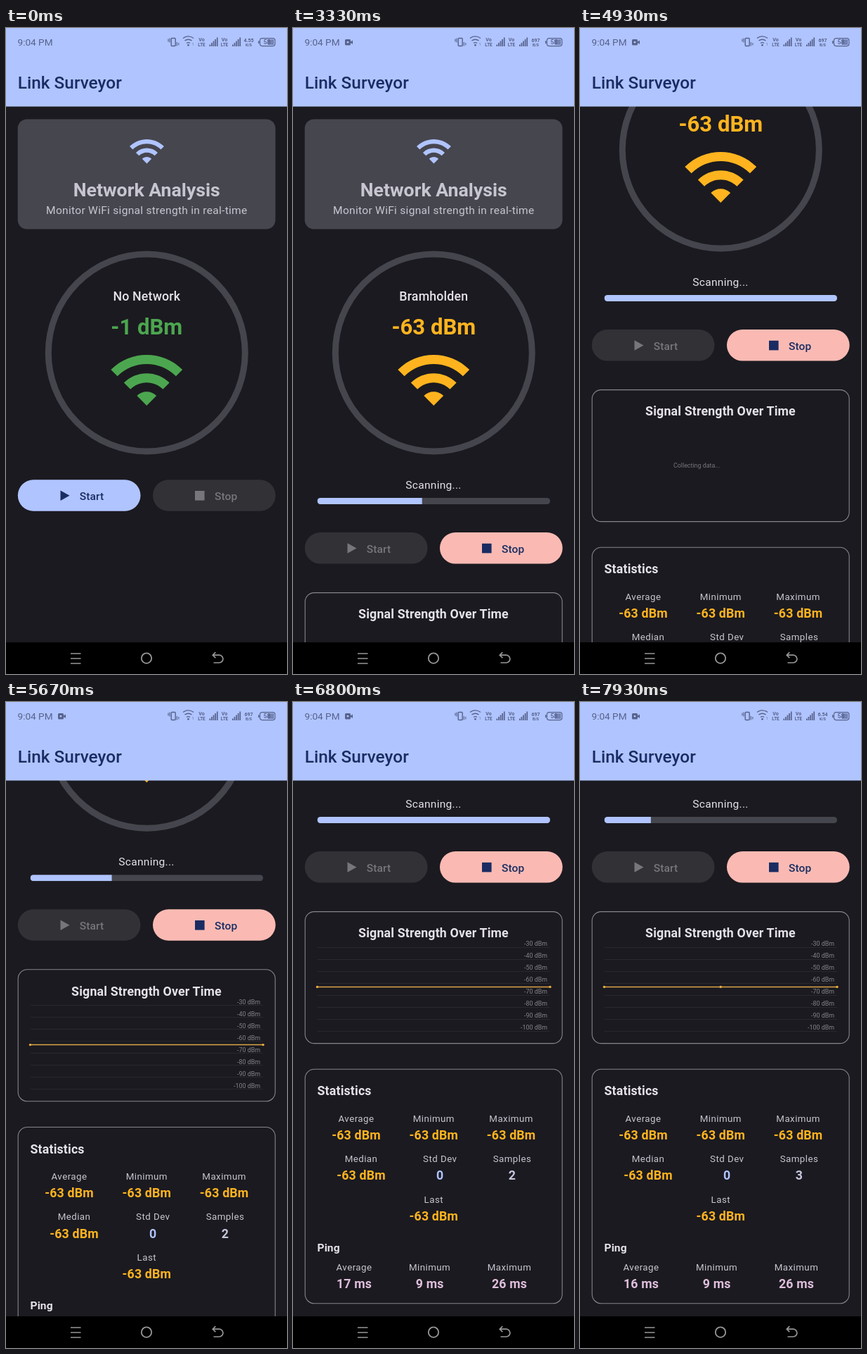
Animation of 400x917 px, one loop 8000 ms. Source, as an HTML page:

```html
<!DOCTYPE html>
<html lang="en">
<head>
<meta charset="utf-8">
<title>Signal monitor</title>
<style>
html, body { margin: 0; width: 100%; height: 100%; overflow: hidden; background: #1b1a20; }
svg { display: block; width: 400px; height: 917px; font-family: Roboto, sans-serif; }
</style>
</head>
<body>
<svg id="stage" viewBox="0 0 400 917"></svg>
<script>
const LOOP = 8000, STEP = 1000 / 15;
const C = { blue: '#b0c4ff', navy: '#1a2c62', panel: '#46464f', soft: '#c7c6d0', text: '#e5e2e8',
  amber: '#ffb41f', green: '#4ca64f', off: '#323136', offText: '#77767b', pink: '#fabab3',
  line: '#85858c', status: '#56628c', lilac: '#dfbfdc', nav: '#96969a', dark: '#1b1a20' };
const stage = document.getElementById('stage');

function el(tag, attrs, parent = stage) {
  const node = document.createElementNS('http://www.w3.org/2000/svg', tag);
  for (const k in attrs) node.setAttribute(k, attrs[k]);
  parent.append(node);
  return node;
}
const group = (parent, attrs = {}) => el('g', attrs, parent);
const rect = (p, x, y, width, height, fill, rx = 0, more = {}) =>
  el('rect', { x, y, width, height, fill, rx, ...more }, p);
const path = (p, d, attrs) => el('path', { d, ...attrs }, p);
const stroke = (color, width) => ({ fill: 'none', stroke: color, 'stroke-width': width });

// y is the middle of the capital letters
function text(p, str, x, y, size, fill, weight = 400, anchor = 'middle', spacing = 0) {
  const node = el('text', { x, y: y + size * 0.355, 'font-size': size, fill, 'font-weight': weight,
    'text-anchor': anchor, 'letter-spacing': spacing }, p);
  node.textContent = str;
  return node;
}
const show = (node, on) => node.setAttribute('visibility', on ? 'inherit' : 'hidden');

function wifi(p, x, y, scale, fill) {
  return path(p, 'M1 9l2 2c4.97-4.97 13.03-4.97 18 0l2-2C16.93 2.93 7.08 2.93 1 9z' +
    'm8 8l3 3 3-3c-1.65-1.66-4.34-1.66-6 0z' +
    'm-4-4l2 2c2.76-2.76 7.24-2.76 10 0l2-2C15.14 9.14 8.87 9.14 5 13z',
    { fill, transform: `translate(${x} ${y}) scale(${scale})` });
}

// page content
rect(stage, 0, 0, 400, 917, C.dark);
const page = group(stage);
rect(page, 16.7, 129.5, 366.8, 156, C.panel, 13);
wifi(page, 173.8, 148, 2.222, C.blue);
text(page, 'Network Analysis', 200.3, 230, 26.67, C.soft, 700);
text(page, 'Monitor WiFi signal strength in real-time', 200.3, 258, 15.55, C.soft, 400, 'middle', 0.28);

el('circle', { cx: 200.3, cy: 461, r: 140, ...stroke('#45454d', 9) }, page);
const network = text(page, '', 200.3, 380.8, 17.78, C.text, 500, 'middle', 0.17);
const level = text(page, '', 200.3, 423.5, 31.1, C.green, 700);
const bigIcon = wifi(page, 144.7, 443.4, 4.63, C.green);

// scan progress
const scan = group(page);
text(scan, 'Scanning...', 200, 648.5, 15.55, C.text, 400, 'middle', 0.28);
const clip = el('clipPath', { id: 'bar' }, scan);
rect(clip, 34.6, 667, 331.4, 9, '#fff', 4.5);
const bar = group(scan, { 'clip-path': 'url(#bar)' });
rect(bar, 34, 667, 333, 9, '#45454e');
const fill = rect(bar, 34.6, 667, 0, 9, C.blue);

// buttons
const buttons = group(page);
function button(x, label, icon) {
  const box = rect(buttons, x, 641.3, 174.7, 44.5, C.off, 22.25);
  const mark = path(buttons, icon, {});
  const name = text(buttons, label, x + 88, 664.5, 15.55, C.offText, 500, 'start', 0.11);
  return (bg, fg) => {
    box.setAttribute('fill', bg);
    mark.setAttribute('fill', fg);
    name.setAttribute('fill', fg);
  };
}
const start = button(16.8, 'Start', 'M77.5 656.5V671L90.5 663.8Z');
const stop = button(209, 'Stop', 'M269 657h13.6v13.6h-13.6Z');
const press = el('clipPath', { id: 'press' }, page);
rect(press, 16.8, 641.3, 174.7, 44.5, '#fff', 22.25);
const ripple = el('circle', { cx: 104, cy: 663.5, r: 0, fill: C.navy, opacity: 0,
  'clip-path': 'url(#press)' }, page);

// chart and statistics
const results = group(page);
const card = (y, h) => rect(results, 17.2, y, 366, h, 'none', 13, { stroke: C.line, 'stroke-width': 1.1 });
card(801.6, 187);
card(1025.3, 332.5);
text(results, 'Signal Strength Over Time', 200, 832, 17.78, C.text, 700, 'middle', 0.17);
const waiting = text(results, 'Collecting data...', 133, 908.5, 8.9, C.offText, 400, 'start');
const chart = group(results);
for (let i = 0; i < 8; i++) {
  const y = 852 + 17 * i;
  rect(chart, 34.5, y, 331.5, 0.8, '#2d2c33');
  text(chart, `-${30 + 10 * i} dBm`, 362, y - 4.8, 8.9, '#85848a', 400, 'end');
}
path(chart, 'M34.5 908.4H366', stroke('#dba447', 1.5));
const dot = x => el('circle', { cx: x, cy: 908.4, r: 1.7, fill: '#f0b040' }, chart);
dot(34.5);
dot(366);
const midDot = dot(200.2);

text(results, 'Statistics', 34.5, 1056, 17.78, C.text, 700, 'start', 0.17);
text(results, 'Ping', 34.5, 1278, 15.55, C.text, 700, 'start', 0.1);
function stat(label, x, y, value, color) {
  text(results, label, x, y, 13.33, C.soft, 400, 'middle', 0.44);
  return text(results, value, x, y + 23.5, 17.78, color, 700, 'middle', 0.17);
}
const DBM = '-63 dBm';
const columns = ['Average', 'Minimum', 'Maximum'];
columns.forEach((name, i) => stat(name, 90 + 110.3 * i, 1095, DBM, C.amber));
stat('Median', 97, 1152.5, DBM, C.amber);
stat('Std Dev', 209.3, 1152.5, '0', C.blue);
const samples = stat('Samples', 312, 1152.5, '1', '#c4c6dc');
stat('Last', 200.3, 1210, DBM, C.amber);
const pings = columns.map((name, i) =>
  stat(name, [87, 194.6, 308][i], 1306.5, ['17 ms', '9 ms', '26 ms'][i], C.lilac));

// app bar and status bar
rect(stage, 0, 0, 400, 111.5, C.blue);
text(stage, 'Link Surveyor', 16.8, 77, 24.4, C.navy, 500, 'start');
const status = group(stage, { fill: C.status });
text(status, '9:04 PM', 16.5, 20.5, 13.6, C.status, 400, 'start');
const camera = group(status);
rect(camera, 74, 16, 8, 8.5, C.status, 1.5);
path(camera, 'M82 19.5l3-2v5.6l-3-2z', {});
el('circle', { cx: 78, cy: 20.2, r: 1.4, fill: C.blue }, camera);

rect(status, 235.2, 14.5, 6, 11, 'none', 1, { stroke: C.status, 'stroke-width': 1.4 });
path(status, 'M231 15.5v4M233 14.5v6M243.3 20v5.5M245.8 21v3.5', stroke(C.status, 1.1));
for (const r of [10.5, 7, 3.5]) {
  const w = r * 0.72, y = 25 - r;
  path(status, `M${259.5 - w} ${y}Q259.5 ${y - r * 0.5} ${259.5 + w} ${y}`, stroke(C.status, 1.3));
}
el('circle', { cx: 259.5, cy: 24.3, r: 1.4 }, status);
text(status, '1', 266, 23.5, 4.5, C.status);
for (const x of [278.5, 311]) {
  text(status, 'Vo', x, 16.8, 7, C.status, 700);
  text(status, 'LTE', x, 23.6, 6.4, C.status, 700);
  for (let i = 0; i < 5; i++) rect(status, x + 11 + 2.6 * i, 23.5 - 2.5 * i, 1.7, 2.5 + 2.5 * i, C.status);
}
const rate = text(status, '', 345.5, 17.3, 7, C.status, 700);
const unit = text(status, '', 345.5, 24.3, 5.6, C.status, 700);
rect(status, 361.5, 14.6, 21.5, 11, 'none', 3, { stroke: C.status, 'stroke-width': 1.1 });
rect(status, 372.5, 16.2, 9, 7.8, '#7483b4', 1);
rect(status, 359, 18, 1.6, 4.4, C.status, 0.8);
text(status, '58', 371.5, 20.2, 9, C.status, 500);

// navigation bar
rect(stage, 0, 872, 400, 45, '#000');
path(stage, 'M92 888H106.5M92 895H106.5M92 902H106.5', stroke(C.nav, 1.6));
el('circle', { cx: 200, cy: 894.6, r: 7.2, ...stroke(C.nav, 1.8) });
path(stage, 'M294.5 890.2H303.5a5.4 5.4 0 0 1 0 10.8H295.5M298.3 886.2L294.3 890.2L298.3 894.2', stroke(C.nav, 1.7));

// [time, value] points
const SCROLL = [[4333, 0], [4600, 125], [4933, 288], [5000, 288], [5133, 302], [5200, 302],
  [5600, 410], [5933, 468], [6000, 468], [6400, 504]];
const PROGRESS = [[2000, 0], [2667, .45], [3333, .45], [3467, .5], [4133, 1], [5200, 1], [5267, .05],
  [5933, .55], [6000, .55], [6067, .6], [6600, 1], [7533, 1], [7600, .05], [7733, .05], [7800, .1], [7933, .2]];

function at(points, t) {
  if (t <= points[0][0]) return points[0][1];
  for (let i = 1; i < points.length; i++) {
    const [a, from] = points[i - 1], [b, to] = points[i];
    if (t < b) return from + (to - from) * (t - a) / (b - a);
  }
  return points[points.length - 1][1];
}

function draw(time) {
  const t = Math.floor((time % LOOP + 10) / STEP) * STEP + 1;
  const scanning = t >= 2000, found = t >= 3330;
  const count = t >= 7600 ? 3 : t >= 5266 ? 2 : 1;

  camera.setAttribute('opacity', Math.min(1, Math.max(0, (t - 133) / 333)));
  page.setAttribute('transform', `translate(0 ${-at(SCROLL, t)})`);

  network.textContent = found ? 'Bramholden' : 'No Network';
  level.textContent = found ? DBM : '-1 dBm';
  for (const node of [level, bigIcon]) node.setAttribute('fill', found ? C.amber : C.green);

  show(scan, scanning);
  fill.setAttribute('width', 331.4 * Math.round(at(PROGRESS, t) * 20) / 20);
  buttons.setAttribute('transform', `translate(0 ${scanning ? 74.8 : 0})`);
  start(scanning ? C.off : C.blue, scanning ? C.offText : C.navy);
  stop(scanning ? C.pink : C.off, scanning ? C.navy : C.offText);
  const k = Math.min(1, (t - 1533) / 267);
  ripple.setAttribute('r', Math.max(0, 92 * k));
  ripple.setAttribute('opacity', t >= 1600 && !scanning ? 0.1 : 0);

  show(results, found);
  show(waiting, found && count < 2);
  show(chart, found && count > 1);
  show(midDot, found && count > 2);
  samples.textContent = count;
  pings[0].textContent = count > 2 ? '16 ms' : '17 ms';

  const [speed, per] = t >= 7600 ? ['6.54', 'K/S'] : t >= 2333 ? ['697', 'B/S'] : ['4.55', 'K/S'];
  rate.textContent = speed;
  unit.textContent = per;
}

function tick() {
  draw(performance.now());
  requestAnimationFrame(tick);
}
tick();
</script>
</body>
</html>
```
